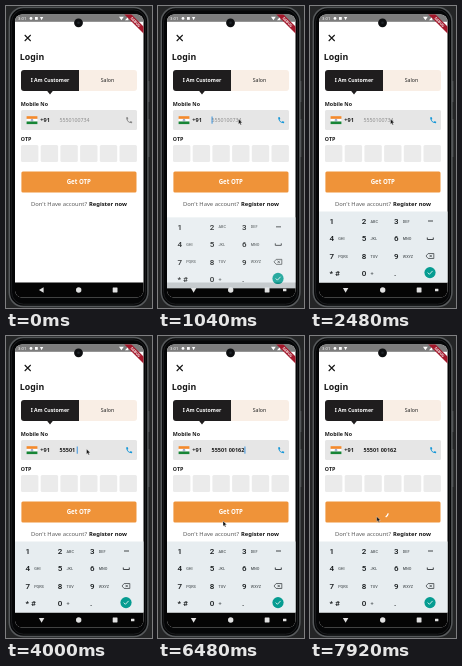
Write an HTML page that moves like this. It is 146 by 302 pixels and loops after 8 s.

```html
<!DOCTYPE html>
<html lang="en">
<head>
<meta charset="utf-8">
<title>Login</title>
<style>
  html, body { margin: 0; width: 100%; height: 100%; overflow: hidden; background: #242526; }
  svg { display: block; width: 100%; height: 100%; }
  text { font-family: "Noto Sans", "Open Sans", sans-serif; white-space: pre; }
  .mid { text-anchor: middle; }
  .pad text { font-family: Roboto, sans-serif; font-weight: 500; }
</style>
</head>
<body>
<svg viewBox="0 0 146 302">
  <defs>
    <clipPath id="screen"><rect x="9" y="8.5" width="128.5" height="283" rx="7"/></clipPath>
  </defs>

  <rect width="146" height="302" fill="#242526"/>
  <path d="M142.7 75V96M142.7 113V151" stroke="#56595c" stroke-width="1.2"/>
  <rect x="3.3" y="1.5" width="138.6" height="299" rx="14" fill="#050607" stroke="#56595b" stroke-width="1.5"/>
  <rect x="5.6" y="3.8" width="134" height="294.4" rx="12" fill="none" stroke="#222426" stroke-width=".8"/>

  <g clip-path="url(#screen)">
    <rect x="9" y="8" width="129" height="284" fill="#fff"/>
    <rect x="9" y="8" width="129" height="7.8" fill="#7c7c7c"/>
    <text x="12" y="14" font-size="4.2" font-weight="500" fill="#fff">3:01</text>
    <g fill="#fff">
      <circle cx="25" cy="12.4" r="1.4"/>
      <rect x="29" y="11" width="2.8" height="2.8"/>
      <path d="M34 11h3.2l-1.6 3.2zM113 10.800h4.800l-2.400 3.400zM119 14.200h3.400v-3.600z"/>
    </g>

    <path d="M18.7 29l6 6m0-6l-6 6" stroke="#161616" stroke-width="1.1"/>
    <text x="13.8" y="54" font-size="8.8" font-weight="700" fill="#181818">Login</text>

    <path d="M73 64h55q3 0 3 3v15q0 3-3 3H73z" fill="#f9eee5"/>
    <path d="M73 64H18q-3 0-3 3v15q0 3 3 3h23.2l2.8 3.4 2.8-3.4H73z" fill="#1f1d1e"/>
    <text class="mid" x="44" y="76.2" font-size="5.2" font-weight="600" fill="#fff">I Am Customer</text>
    <text class="mid" x="101.5" y="76.2" font-size="5.2" font-weight="500" fill="#222">Salon</text>

    <text x="14.8" y="100.2" font-size="5.35" font-weight="600" fill="#1c1c1c">Mobile No</text>
    <rect x="15" y="104" width="116" height="20" rx="1.5" fill="#e6e6e6"/>
    <rect x="20.6" y="110.2" width="10.8" height="2.7" fill="#f58a2c"/>
    <rect x="20.6" y="112.9" width="10.8" height="2.6" fill="#fff"/>
    <rect x="20.6" y="115.5" width="10.8" height="2.6" fill="#168535"/>
    <circle cx="26" cy="114.2" r=".9" fill="none" stroke="#36458f" stroke-width=".5"/>
    <text x="34.3" y="116.2" font-size="5.6" font-weight="600" fill="#222">+91</text>
    <text id="hint" x="53.5" y="116.2" font-size="5.25" fill="#8c8c8c">5550100734</text>
    <text id="entry" x="53.5" y="116.2" font-size="5.5" font-weight="600" fill="#1a1a1a"></text>
    <rect id="caret" y="110.5" width=".9" height="7.2" fill="#2688d8"/>
    <path id="phone" transform="translate(119.2 110.3) scale(.33)" d="M6.6 10.8c1.4 2.8 3.8 5.1 6.6 6.6l2.2-2.2c.3-.3.7-.4 1-.2 1.1.4 2.3.6 3.6.6.6 0 1 .4 1 1V20c0 .6-.4 1-1 1C10.6 21 3 13.4 3 4c0-.6.5-1 1-1h3.5c.6 0 1 .4 1 1 0 1.3.2 2.5.6 3.6.1.3 0 .7-.2 1z"/>

    <text x="14.8" y="135.4" font-size="5.35" font-weight="600" fill="#1c1c1c">OTP</text>
    <g id="boxes" fill="#ebebeb"></g>

    <rect x="15.4" y="165.4" width="115.1" height="21.1" rx="1.5" fill="#ef9339"/>
    <rect id="splash" x="15.4" y="165.4" width="115.1" height="21.1" rx="1.5" fill="#8f9a70"/>
    <text id="action" class="mid" x="72.8" y="178.2" font-size="6.1" font-weight="700" fill="#fff">Get OTP</text>
    <path id="spinner" fill="none" stroke="#fff" stroke-width="1.3"/>

    <text x="25" y="199.5" font-size="5.85" font-weight="500" fill="#5a5a5a">Don't Have account?</text>
    <text x="83" y="199.5" font-size="5.8" font-weight="700" fill="#141414">Register now</text>

    <rect x="9" y="276.5" width="129" height="16" fill="#050505"/>
    <g fill="#e2e2e2">
      <path id="back" d="M37.600 281.300v5.400l-4.700-2.700z"/>
      <circle cx="72.700" cy="284" r="2.700"/>
      <rect x="106.700" y="281.600" width="4.800" height="4.800" rx=".4"/>
      <rect id="switch" x="125" y="282.800" width="3.400" height="2.400" rx=".3" opacity="0"/>
    </g>

    <g id="pad" class="pad">
      <rect x="9" y="205.500" width="129" height="71" fill="#e7edf0"/>
      <g id="keys"></g>
      <g fill="none" stroke="#2f3437" stroke-width=".9">
        <path d="M118 215h5M117.300 231.500v2h6v-2"/>
        <path d="M116 250l2.200-2.500h5.600v5h-5.600zM119.500 248.800l2.400 2.400m0-2.400l-2.400 2.400" stroke-width=".7"/>
      </g>
      <circle cx="120" cy="266.600" r="5.600" fill="#069c91"/>
      <path d="M117.700 266.600l1.700 1.700 3.200-3.400" fill="none" stroke="#fff" stroke-width=".8"/>
    </g>

    <g transform="translate(129.500 16) rotate(45)">
      <rect x="-18" y="-2.500" width="36" height="5" fill="#a3182b"/>
      <text class="mid" y="1.300" font-size="3.600" font-weight="700" fill="#fff">DEBUG</text>
    </g>
  </g>
  <circle cx="72.500" cy="16.800" r="4.400" fill="#0c0e10"/>
  <circle cx="72.500" cy="16.800" r="1.300" fill="#20262b"/>
  <path id="mouse" d="M0 0v5.200l1.200-1 .9 1.900.9-.4-.9-1.900h1.700z" fill="#111" stroke="#fff" stroke-width=".35"/>
</svg>

<script>
const LOOP = 8000, FOCUS = 970, PAD_IN = 940, SUBMIT = 6885;
const NUMBER = "55501 00162";
const KEY_TIMES = [2710, 2870, 3030, 3190, 3335, 3990, 4080, 4230, 4560, 5110, 5335];
const $ = id => document.getElementById(id);
const set = (id, attrs) => {
  for (const name in attrs) $(id).setAttribute(name, attrs[name]);
};
const show = (id, on) => set(id, { opacity: +on });
const clamp = v => Math.min(1, Math.max(0, v));
const span = (t, from, to) => clamp((t - from) / (to - from));
const smooth = p => p * p * (3 - 2 * p);

// cubic-bezier(.4, 0, .2, 1)
function fastOutSlowIn(x) {
  let lo = 0, hi = 1;
  for (let i = 0; i < 18; i++) {
    const u = (lo + hi) / 2, v = 1 - u;
    if (1.2 * v * v * u + .6 * v * u * u + u ** 3 < x) lo = u; else hi = u;
  }
  return 3 * (1 - lo) * lo * lo + lo ** 3;
}

function build() {
  for (let i = 0; i < 6; i++) {
    $("boxes").innerHTML += `<rect x="${15 + i * 19.7}" y="139" width="17.4" height="17" rx="1.5"/>`;
  }
  const labels = ["1", "2 ABC", "3 DEF", "4 GHI", "5 JKL", "6 MNO", "7 PQRS", "8 TUV", "9 WXYZ", "*_#", "0 +", "."];
  $("keys").innerHTML = labels.map((label, i) => {
    const [main, sub = ""] = label.split(" ");
    const x = 19.5 + i % 3 * 32.3, y = 217.7 + Math.floor(i / 3) * 17.5;
    const size = sub === "+" ? 5.5 : 3.8;
    return `<text x="${x}" y="${y}" font-size="8" fill="#14181a">${main.replace("_", " ")}</text>` +
      `<text x="${x + 8.7}" y="${y - 1.2}" font-size="${size}" fill="#565d60">${sub}</text>`;
  }).join("");
}

function drawField(t) {
  const count = KEY_TIMES.filter(k => k <= t).length;
  const typed = NUMBER.slice(0, count);
  const digits = typed.replace(" ", "").length;
  const last = count ? KEY_TIMES[count - 1] : FOCUS;
  $("entry").textContent = typed;
  show("hint", !count);
  set("caret", { x: 53.6 + digits * 3.146 + (count - digits) * 1.43 });
  show("caret", t >= FOCUS && (t - last) % 1000 < 500);
  set("phone", { fill: t >= FOCUS ? "#1597d8" : "#858585" });
}

// The keyboard slides in above the navigation bar.
function drawPad(t) {
  const p = span(t, PAD_IN, PAD_IN + 280);
  set("pad", { transform: `translate(0 ${22 * (1 - p) ** 3})`, opacity: clamp(p * 2.4) });
  set("back", { transform: t >= PAD_IN ? "rotate(-90 35.6 284)" : "" });
  show("switch", t >= PAD_IN);
}

function drawButton(t) {
  const s = t - SUBMIT, busy = s >= 0;
  show("action", !busy);
  show("spinner", busy);
  set("splash", { opacity: .14 * span(t, SUBMIT - 30, SUBMIT + 100) * (1 - span(t, 7300, 7750)) });
  if (!busy) return;
  const cycle = s % 1333 / 1333, arc = 1.5 * Math.PI;
  const head = fastOutSlowIn(clamp(cycle * 2));
  const tail = fastOutSlowIn(clamp(cycle * 2 - 1));
  const a = -Math.PI / 2 + tail * arc + s / 2222 * 2 * Math.PI + cycle * Math.PI / 2;
  const sweep = Math.max((head - tail) * arc, .01);
  const at = q => `${72.5 + 5.9 * Math.cos(q)} ${176 + 5.9 * Math.sin(q)}`;
  set("spinner", { d: `M${at(a)}A5.9 5.9 0 ${+(sweep > Math.PI)} 1 ${at(a + sweep)}` });
}

function drawMouse(t) {
  const enter = smooth(span(t, 60, 740));
  const down = smooth(span(t, 5980, 6440));
  const settle = smooth(span(t, 6520, 6800));
  const x = 125 - 44.5 * enter - 15.5 * down + 1.7 * settle;
  const y = 183 - 70 * enter + 72 * down - 4.5 * settle;
  set("mouse", { transform: `translate(${x} ${y})` });
  show("mouse", t >= 80);
}

function draw(t) {
  drawField(t);
  drawPad(t);
  drawButton(t);
  drawMouse(t);
}

build();
draw(0);
let start;
requestAnimationFrame(function tick(now) {
  start ??= now;
  draw((now - start) % LOOP);
  requestAnimationFrame(tick);
});
</script>
</body>
</html>
```
